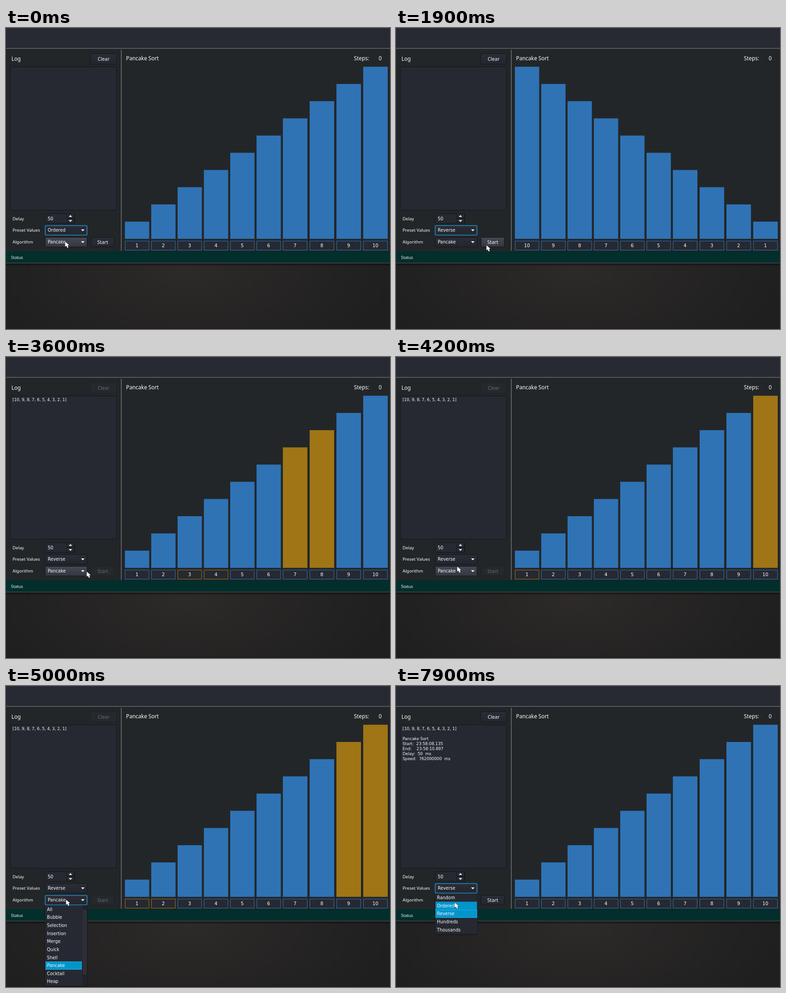
Recreate the animation shown at these times as an HTML page. Size 846 by 662 pixels, loop 8000 ms.

```html
<!DOCTYPE html>
<html lang="en">
<head>
<meta charset="utf-8">
<title>Sorting visualiser</title>
<style>
  html, body { margin: 0; width: 100%; height: 100%; overflow: hidden; background: #232628; }
  svg { display: block; width: 846px; height: 662px; }
  text { fill: #fcfcfc; white-space: pre; font-family: "DejaVu Sans", sans-serif; font-size: 9.6px; }
  .title { font: 11.8px "Noto Sans", sans-serif; }
  .button { font: 10.8px "Noto Sans", sans-serif; text-anchor: middle; }
  .label { font: 9.6px "Noto Sans", sans-serif; }
  .status { font: 9px "Noto Sans", sans-serif; }
  .log { font-size: 8.8px; }
  .value { font-size: 10.3px; text-anchor: middle; }
</style>
</head>
<body>
<svg id="stage" viewBox="0 0 846 662">
  <defs>
    <radialGradient id="desk" gradientUnits="userSpaceOnUse" cx="400" cy="530" r="460" gradientTransform="translate(0 265) scale(1 .5)">
      <stop offset="0" stop-color="#2d2a29"/><stop offset="1" stop-color="#1f1f1f"/>
    </radialGradient>
    <linearGradient id="shade" x2="0" y2="1">
      <stop offset="0" stop-color="#000" stop-opacity=".5"/><stop offset="1" stop-color="#000" stop-opacity="0"/>
    </linearGradient>
    <linearGradient id="normal" x2="0" y2="1">
      <stop offset="0" stop-color="#2a2d37"/><stop offset="1" stop-color="#23262e"/>
    </linearGradient>
    <linearGradient id="hover" x2="0" y2="1">
      <stop offset="0" stop-color="#454854"/><stop offset="1" stop-color="#343741"/>
    </linearGradient>
  </defs>
</svg>
<script>
const stage = document.getElementById('stage');
const LOOP = 8000, FRAME = 100;
const BLUE = '#2f73b5', ORANGE = '#a07516', FIELD = '#262932', EDGE = '#131518', FOCUS = '#1d8fd0';

function add(tag, attrs, parent = stage) {
  const el = document.createElementNS('http://www.w3.org/2000/svg', tag);
  set(el, attrs);
  parent.append(el);
  return el;
}
function set(el, attrs) {
  for (const key in attrs) el.setAttribute(key, attrs[key]);
}
const rect = (x, y, width, height, fill, more = {}, parent) =>
  add('rect', { x, y, width, height, fill, ...more }, parent);
const frame = (x, y, w, h, fill, stroke = EDGE, rx = 2, parent) =>
  rect(x + .5, y + .5, w - 1, h - 1, fill, { stroke, rx }, parent);
function text(x, y, content, cls = '', parent) {
  const el = add('text', { x, y, class: cls }, parent);
  el.textContent = content;
  return el;
}
const show = (el, on) => set(el, { visibility: on ? 'visible' : 'hidden' });

// Window
rect(0, 0, 846, 491, '#232628');
rect(0, 0, 846, 44, '#272a33');
rect(0, 0, 846, 1, '#34373d');
rect(0, 44, 846, 1.5, '#66696b');
rect(251, 48, 6, 442, '#17191b');
rect(252.5, 48, 3, 442, '#54575c');
rect(0, 491, 846, 25, '#022e2b');
rect(0, 518, 846, 144, 'url(#desk)');
rect(0, 516, 846, 2, '#3a3d3f');
rect(0, 518, 846, 6, 'url(#shade)');
rect(0, 660, 846, 2, '#211a1e');
text(11, 507.5, 'Status', 'status');
text(12, 72, 'Log', 'title');
text(264.5, 71.3, 'Pancake Sort', 'title');
text(766.5, 71.3, 'Steps:', 'title');
text(821, 71.3, '0', 'title');

// Log
frame(9, 85, 235, 316, FIELD);
const logList = text(14.5, 97.2, '[10, 9, 8, 7, 6, 5, 4, 3, 2, 1]', 'log');
const logResult = add('g', {});
['Pancake Sort', 'Start:  23:58:08.135', 'End:    23:58:10.897', 'Delay:  50  ms', 'Speed:  762000000  ms']
  .forEach((line, i) => text(14.5, 119.2 + 11 * i, line, 'log', logResult));

// Controls
text(14.5, 422.7, 'Delay', 'label');
text(14.5, 448.3, 'Preset Values', 'label');
text(14.5, 474, 'Algorithm', 'label');
frame(86, 408, 66, 22, FIELD);
frame(133, 408, 18, 11, 'url(#normal)');
frame(133, 419, 18, 11, 'url(#normal)');
add('path', { d: 'M138.3 415.5h7.4l-3.7-4zM138.3 422.5h7.4l-3.7 4z', fill: '#fcfcfc' });
text(92, 422.7, '50');

function makeButton(x, y, w, h, caption) {
  const box = frame(x, y, w, h, 'url(#normal)');
  const label = text(x + w / 2, y + h / 2 + 3.7, caption, 'button');
  return ({ enabled, hover, focus }) => {
    set(box, {
      fill: !enabled ? '#25282c' : hover ? 'url(#hover)' : 'url(#normal)',
      stroke: focus ? FOCUS : enabled ? EDGE : '#1e2023'
    });
    label.style.fill = enabled ? '#fcfcfc' : '#6a6c6f';
  };
}
function makeCombo(y) {
  const box = frame(86, y, 93, 22, 'url(#normal)');
  const label = text(92, y + 14.2, '');
  add('path', { d: `M165.3 ${y + 9}h7.8l-3.9 4z`, fill: '#fcfcfc' });
  return (value, hover, focus) => {
    label.textContent = value;
    set(box, {
      fill: hover ? 'url(#hover)' : 'url(#normal)',
      stroke: focus ? FOCUS : EDGE,
      'stroke-width': focus ? 1.6 : 1
    });
  };
}
const clearButton = makeButton(186, 56, 58, 24, 'Clear');
const startButton = makeButton(187, 460, 52, 22, 'Start');
const presetCombo = makeCombo(434);
const algorithmCombo = makeCombo(460);

// Bars
const columns = Array.from({ length: 10 }, (_, i) => {
  const x = 262 + 58 * i + Math.max(0, i - 6);
  const w = i < 6 ? 53.5 : 54;
  return {
    bar: rect(x, 0, w, 0, BLUE),
    box: frame(x, 468, w, 21, FIELD, BLUE, 0),
    label: text(x + w / 2 - .3, 482.2, '', 'value')
  };
});

function makePopup(top, items, rowWidth) {
  const ROW = 17.65;
  const group = add('g', {});
  const height = ROW * items.length;
  rect(85, top, 95, height + 3, '#000', { opacity: .25, rx: 2 }, group);
  rect(86.5, top, 92.5, height + .5, FIELD, {}, group);
  const rows = items.map((item, i) => {
    const y = top + ROW * i;
    const back = rect(87, y, rowWidth, ROW, '#0295cb', {}, group);
    const outline = rect(87.5, y + .5, rowWidth - 1, ROW - 1, 'none', { stroke: '#23b3e6' }, group);
    text(90.3, y + 12.2, item, '', group);
    return { back, outline };
  });
  if (rowWidth < 90) {
    rect(168, top, 10.5, height, '#202329', {}, group);
    frame(169.5, top + 10, 7.5, 142, '#2a2d36', '#3b3e46', 2, group);
  }
  return (open, selected, cursorY) => {
    show(group, open);
    const hovered = Math.floor((cursorY - top) / ROW);
    rows.forEach(({ back, outline }, i) => {
      show(back, open && (i === selected || i === hovered));
      show(outline, open && i === selected);
    });
  };
}
const presetPopup = makePopup(456.7, ['Random', 'Ordered', 'Reverse', 'Hundreds', 'Thousands'], 91.5);
const algorithmPopup = makePopup(482.4,
  ['All', 'Bubble', 'Selection', 'Insertion', 'Merge', 'Quick', 'Shell', 'Pancake', 'Cocktail', 'Heap'], 80);

const pointer = add('path', {
  d: 'M0 0V11.8L3 9.8L5 14.3L8 13L6.2 9L9.3 7.8Z',
  fill: '#fff', stroke: '#1b1d20', 'stroke-width': .6
});

// time, x, y of the pointer tip
const PATH = [
  [0, 130, 469.5], [300, 131, 447], [600, 131, 447], [1200, 132, 498], [1400, 132, 498],
  [1900, 199, 477.5], [2100, 192.5, 475.5], [3300, 192.5, 475.5], [4200, 134.5, 460.5],
  [4600, 132, 469.5], [5000, 132, 469.5], [6000, 110, 643], [6100, 110, 643],
  [6600, 130, 468], [6800, 132, 465], [7100, 132, 447], [7300, 132, 447], [7900, 129, 476]
];
function pointerAt(t) {
  const next = PATH.findIndex(p => p[0] >= t);
  if (next < 1) return PATH[0].slice(1);
  const [t0, x0, y0] = PATH[next - 1], [t1, x1, y1] = PATH[next];
  const k = (t - t0) / (t1 - t0), e = k * k * (3 - 2 * k);
  return [x0 + (x1 - x0) * e, y0 + (y1 - y0) * e];
}

// Each pass scans a prefix one shorter than the last; the first pass ends with a full flip.
const SORT_START = 2480, STEP = 50.2, SORT_STEPS = 55;
function sortState(t) {
  const step = Math.floor((t - SORT_START) / STEP);
  const running = step >= 0 && step < SORT_STEPS;
  const flipped = step >= 10;
  let marks = [];
  if (running) {
    let i = step, size = 10;
    while (i >= size) i -= size--;
    marks = [flipped ? Math.max(0, i - 1) : 0, i];
  }
  return { running, flipped, marks, started: step >= 0, done: step >= SORT_STEPS };
}

function render(t) {
  const sort = sortState(t);
  const [x, y] = pointerAt(t);
  const within = (left, top, w, h) => x >= left && x < left + w && y >= top && y < top + h;
  const presetOpen = (t >= 600 && t < 1400) || t >= 7300;
  const algorithmOpen = t >= 4700 && t < 6700;
  const open = presetOpen || algorithmOpen;
  const reversed = t >= 1400;

  columns.forEach(({ bar, box, label }, i) => {
    const value = reversed && !sort.flipped ? 10 - i : i + 1;
    const height = 37.85 * value;
    const barIndex = sort.flipped ? 9 - i : i;
    set(bar, { y: 463.7 - height, height, fill: sort.marks.includes(barIndex) ? ORANGE : BLUE });
    set(box, { stroke: sort.marks.includes(i) ? ORANGE : BLUE });
    label.textContent = value;
  });

  show(logList, sort.started);
  show(logResult, sort.done);
  clearButton({ enabled: !sort.running });
  startButton({
    enabled: !sort.running,
    hover: !open && within(187, 460, 52, 22),
    focus: t >= 2400 && !sort.started
  });
  presetCombo(reversed ? 'Reverse' : 'Ordered', !open && within(86, 434, 93, 22), t < 2400 || t >= 7300);
  algorithmCombo('Pancake', !open && within(86, 459, 93, 23), t >= 4700 && t < 7300);
  presetPopup(presetOpen, reversed ? 2 : 1, y);
  algorithmPopup(algorithmOpen, 7, y);
  set(pointer, { transform: `translate(${x} ${y})` });
}

const begin = performance.now();
function tick() {
  const t = (performance.now() - begin) % LOOP;
  render(Math.floor(t / FRAME) * FRAME);
  requestAnimationFrame(tick);
}
tick();
</script>
</body>
</html>
```
